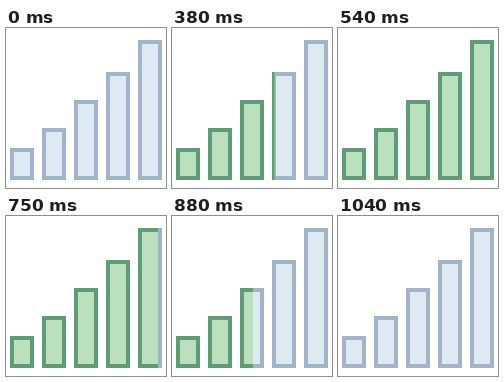
These frames come from a looping animation (160 px wide and 160 px high, 1180 ms). An HTML page:

```html
<!DOCTYPE html>
<html lang="en">
<head>
<meta charset="utf-8">
<title>Signal bars</title>
<style>
  html, body { margin: 0; height: 100%; overflow: hidden; background: #fff; }
  svg { display: block; width: 100%; height: 100%; }
</style>
</head>
<body>
<svg viewBox="0 0 160 160">
  <defs>
    <path id="bars" stroke-width="4" d="M6 122h20v28H6zM38 102h20v48H38zM70 74h20v76H70zM102 46h20v104h-20zM134 14h20v136h-20z"/>
    <clipPath id="wipe"><rect id="cover" width="0" height="160"/></clipPath>
  </defs>
  <use href="#bars" fill="#dfe9f2" stroke="#a0b5cb"/>
  <g clip-path="url(#wipe)"><use href="#bars" fill="#bae0bd" stroke="#5e9c76"/></g>
</svg>
<script>
const LOOP = 1180, FPS = 24, WIDTH = 160;
const cover = document.getElementById('cover');

// Sine ease from 0 to 1, starting at `start` and lasting `length` steps
const ease = (step, start, length) => {
  const p = Math.min(1, Math.max(0, (step - start) / length));
  return (1 - Math.cos(Math.PI * p)) / 2;
};

function draw() {
  const time = performance.now() % LOOP;
  // Motion runs at 24 steps a second, shown on a 10 ms clock
  const step = Math.floor((Math.floor(time / 10) * 10 + 4.9) * FPS / 1000);
  const filled = ease(step, 2.5, 11) - ease(step, 16.78, 8.5);
  cover.setAttribute('width', Math.max(0, WIDTH * filled));
  requestAnimationFrame(draw);
}
draw();
</script>
</body>
</html>
```
